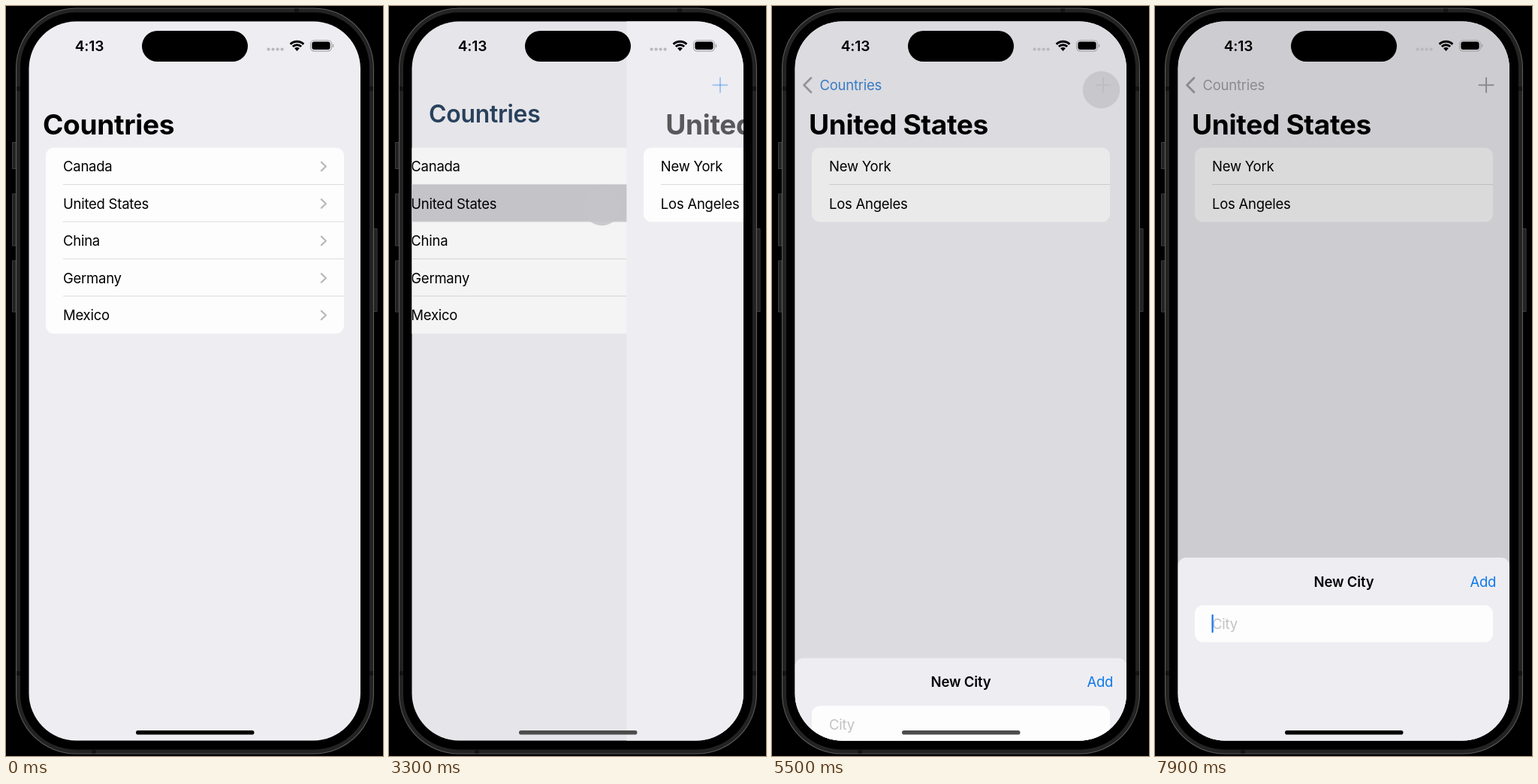
An HTML page with a canvas that plays this animation: 502 by 998 pixels, repeating every 8000 ms.

```html
<!DOCTYPE html>
<html lang="en">
<head>
<meta charset="utf-8">
<title>Countries</title>
<style>
  html, body { margin: 0; width: 100%; height: 100%; overflow: hidden; background: #000; }
  canvas { display: block; width: 502px; height: 998px; }
</style>
</head>
<body>
<canvas id="stage"></canvas>
<script>
const W = 502, H = 998, LOOP = 8000, STEP = 100;
const SCREEN = { x: 30.5, y: 20.5, w: 441.5, h: 957 };
const BG = '#eeedf2', CARD = '#fdfdfd', BLACK = [0, 0, 0], BLUE = [10, 120, 234], GRAY = [161, 161, 165];
const ROW = 49.5, LIST_TOP = 188.5, LIST_X = 53, LIST_W = 397, TEXT_X = 76;
const COUNTRIES = ['Canada', 'United States', 'China', 'Germany', 'Mexico'];
const CITIES = ['New York', 'Los Angeles'];

const canvas = document.getElementById('stage');
const ctx = canvas.getContext('2d');
const dpr = window.devicePixelRatio || 1;
canvas.width = W * dpr;
canvas.height = H * dpr;

const clamp = v => Math.max(0, Math.min(1, v));
const lerp = (a, b, k) => a + (b - a) * k;
const blend = (a, b, k) => a.map((v, i) => Math.round(lerp(v, b[i], k)));
const rgb = c => `rgb(${c})`;

// Critically damped spring from 0 to 1, starting at `start` ms.
function spring(t, start, rate) {
  const s = Math.max(0, t - start) / 1000 * rate;
  return 1 - (1 + s) * Math.exp(-s);
}

// Position on a list of [time, x, y] points.
function along(path, t) {
  let i = 0;
  while (i < path.length - 2 && t > path[i + 1][0]) i++;
  const [a, b] = [path[i], path[i + 1]];
  const k = clamp((t - a[0]) / (b[0] - a[0]));
  return [lerp(a[1], b[1], k), lerp(a[2], b[2], k)];
}

function withAlpha(alpha, draw) {
  ctx.save();
  ctx.globalAlpha *= clamp(alpha);
  draw();
  ctx.restore();
}

function rounded(x, y, w, h, r, fill) {
  ctx.beginPath();
  ctx.roundRect(x, y, w, h, r);
  ctx.fillStyle = fill;
  ctx.fill();
}

function line(points, color, width) {
  ctx.beginPath();
  points.forEach(([x, y]) => ctx.lineTo(x, y));
  ctx.strokeStyle = color;
  ctx.lineWidth = width;
  ctx.lineCap = ctx.lineJoin = 'round';
  ctx.stroke();
}

function text(str, x, y, { size = 18.5, weight = 400, color = '#000', align = 'left' } = {}) {
  ctx.font = `${weight} ${size}px Inter, sans-serif`;
  ctx.letterSpacing = `${size * (weight > 400 ? -0.009 : -0.0135)}px`;
  ctx.textAlign = align;
  ctx.fillStyle = color;
  ctx.fillText(str, x, y);
}

function list(items, { chevrons = false, active = -1 } = {}) {
  ctx.save();
  ctx.beginPath();
  ctx.roundRect(LIST_X, LIST_TOP, LIST_W, ROW * items.length, 11);
  ctx.clip();
  ctx.fillStyle = CARD;
  ctx.fillRect(LIST_X, LIST_TOP, LIST_W, ROW * items.length);
  items.forEach((name, i) => {
    const y = LIST_TOP + i * ROW;
    if (i === active) {
      ctx.fillStyle = '#cbcacf';
      ctx.fillRect(LIST_X, y - 0.5, LIST_W, ROW);
    }
    if (i) {
      ctx.fillStyle = '#dcdcdf';
      ctx.fillRect(TEXT_X, y - 1, LIST_X + LIST_W - TEXT_X, 1);
    }
    text(name, TEXT_X, y + 31.8);
    if (chevrons) line([[420, y + 19.3], [426, y + 25], [420, y + 30.7]], '#bababd', 2.3);
  });
  ctx.restore();
}

function shade(alpha) {
  ctx.fillStyle = `rgba(0,0,0,${alpha})`;
  ctx.fillRect(0, 0, W, H);
}

function phone() {
  ctx.fillStyle = '#000';
  ctx.fillRect(0, 0, W, H);
  for (const [x, y, h] of [[8, 181, 36], [8, 249.5, 70], [8, 338.5, 69], [489, 296, 111]]) {
    rounded(x, y, 5.5, h, 1, '#454545');
    rounded(x + 0.8, y + 0.8, 4, h - 1.6, 1, '#222');
  }
  for (const [inset, color] of [[0, '#5a5a5a'], [1.1, '#232323'], [6, '#000']]) {
    rounded(13 + inset, 2.5 + inset, 477 - 2 * inset, 993 - 2 * inset, 80 - inset, color);
  }
  ctx.fillStyle = '#141414';
  for (const y of [107, 885]) {
    ctx.fillRect(14, y, 5, 6);
    ctx.fillRect(484, y, 5, 6);
  }
  ctx.fillRect(384, 3.5, 6, 5);
  ctx.fillRect(114, 989.5, 6, 5);
}

function statusBar() {
  text('4:13', 111, 60, { size: 19.2, weight: 600, align: 'center' });
  rounded(181, 33, 141, 41, 20.5, '#000');
  for (let i = 0; i < 4; i++) rounded(347.5 + i * 6, 55.5, 4.2, 4.2, 2.1, '#b9b8bc');

  ctx.strokeStyle = ctx.fillStyle = '#000';
  ctx.lineCap = 'butt';
  ctx.lineWidth = 2.9;
  for (const r of [12.5, 8]) {
    ctx.beginPath();
    ctx.arc(387.5, 59.7, r, -Math.PI * 0.75, -Math.PI * 0.25);
    ctx.stroke();
  }
  ctx.beginPath();
  ctx.moveTo(387.5, 60);
  ctx.arc(387.5, 59.7, 4.8, -Math.PI * 0.75, -Math.PI * 0.25);
  ctx.fill();

  ctx.beginPath();
  ctx.roundRect(405.5, 45.7, 28, 14.2, 4.6);
  ctx.strokeStyle = '#a3a2a6';
  ctx.lineWidth = 1.1;
  ctx.stroke();
  rounded(407.4, 47.6, 24.2, 10.4, 2.9, '#000');
  rounded(434.8, 50.6, 1.5, 4.6, [0, 1.5, 1.5, 0], '#a3a2a6');
}

function homeBar(t) {
  const k = clamp((t - 2900) / 400) * (1 - clamp((t - 7300) / 300));
  rounded(173, 964, 157.5, 5.6, 2.8, rgb(blend(BLACK, [76, 76, 76], k)));
}

// Back button and plus; the large title shrinks into the back label.
function navBar(t, push) {
  const label = blend(BLUE, GRAY, clamp((t - 5300) / 600));
  const icon = rgb(blend(BLUE, GRAY, clamp((t - 5200) / 300)));
  withAlpha(1 - 0.8 * push * (1 - push), () =>
    text('Countries', lerp(49, 63.5, push), lerp(171, 112, push), {
      size: lerp(37.1, 18.5, push),
      weight: Math.round(lerp(7, 4, push)) * 100,
      color: rgb(blend(BLACK, label, push)),
    }));
  withAlpha(push * 2 - 1, () =>
    line([[52, 95.8], [42.6, 105.3], [52, 114.8]], icon, 2.8));
  withAlpha(push * 1.25, () => {
    line([[431.5, 105.2], [450.5, 105.2]], icon, 2);
    line([[441, 95.7], [441, 114.7]], icon, 2);
  });
}

function pages(t) {
  const slide = spring(t, 3231, 18), push = spring(t, 3231, 15);
  const w = SCREEN.w, left = SCREEN.x + w * (1 - slide);
  ctx.fillStyle = BG;
  ctx.fillRect(0, 0, W, H);
  if (slide < 0.9995) {
    ctx.save();
    ctx.translate(-0.3 * w * slide, 0);
    list(COUNTRIES, { chevrons: true, active: t >= 2700 ? 1 : -1 });
    ctx.restore();
    shade(0.1 * slide);
  }
  if (slide > 0) {
    ctx.fillStyle = BG;
    ctx.fillRect(left, 0, W, H);
    ctx.save();
    ctx.translate(w * (1 - slide), 0);
    list(CITIES);
    ctx.restore();
    withAlpha(0.35 + push, () =>
      text('United States', 49 + w * (1 - push), 171, { size: 37.1, weight: 700 }));
  }
  navBar(t, push);
}

function sheet(t) {
  const rise = spring(t, 5431, 26);
  if (!rise) return;
  shade(0.137 * rise);
  const top = 978 - 206 * rise - 38 * spring(t, 7240, 15);
  rounded(SCREEN.x, top, SCREEN.w, H - top, [11, 11, 0, 0], BG);
  text('New City', 251.5, top + 38.7, { weight: 600, align: 'center' });
  text('Add', 454.2, top + 38.7, { color: rgb(BLUE), align: 'right' });
  rounded(LIST_X, top + 63.5, LIST_W, 49, 11, CARD);
  text('City', TEXT_X, top + 95.2, { color: '#c2c2c5' });
  if (t >= 7300) rounded(75.5, top + 75.5, 2.2, 24.5, 1.1, '#1775f0');
}

const TOUCHES = [
  { from: 1300, to: 2100, fade: 100,
    path: [[1300, 268.5, 561.5], [1800, 268.5, 556], [1900, 268.5, 556], [2000, 268.5, 507]] },
  { from: 2600, to: 3400, fade: 100, path: [[2600, 283.5, 272.5], [3200, 283.5, 267.5]] },
  { from: 4800, to: 5600, fade: 100, path: [[4800, 438.5, 112.5], [5400, 438.5, 111.5]] },
  { from: 6500, to: 7100, fade: 300, path: [[6500, 210.5, 829], [6700, 173, 870.5]] },
];

function touch(t) {
  for (const { from, to, fade, path } of TOUCHES) {
    if (t < from || t >= to) continue;
    const alpha = 0.85 * clamp(0.3 + (t - from) / 300) * clamp((to - t) / fade);
    const [x, y] = along(path, t);
    withAlpha(alpha, () => rounded(x - 24.7, y - 24.7, 49.4, 49.4, 24.7, '#c5c5c9'));
  }
}

function draw(now) {
  const t = Math.floor(now % LOOP / STEP) * STEP;
  ctx.setTransform(dpr, 0, 0, dpr, 0, 0);
  phone();
  ctx.save();
  ctx.beginPath();
  ctx.roundRect(SCREEN.x, SCREEN.y, SCREEN.w, SCREEN.h, 63);
  ctx.clip();
  pages(t);
  sheet(t);
  statusBar();
  homeBar(t);
  touch(t);
  ctx.restore();
}

const start = performance.now();
function tick() {
  draw(performance.now() - start);
  requestAnimationFrame(tick);
}
tick();
</script>
</body>
</html>
```
